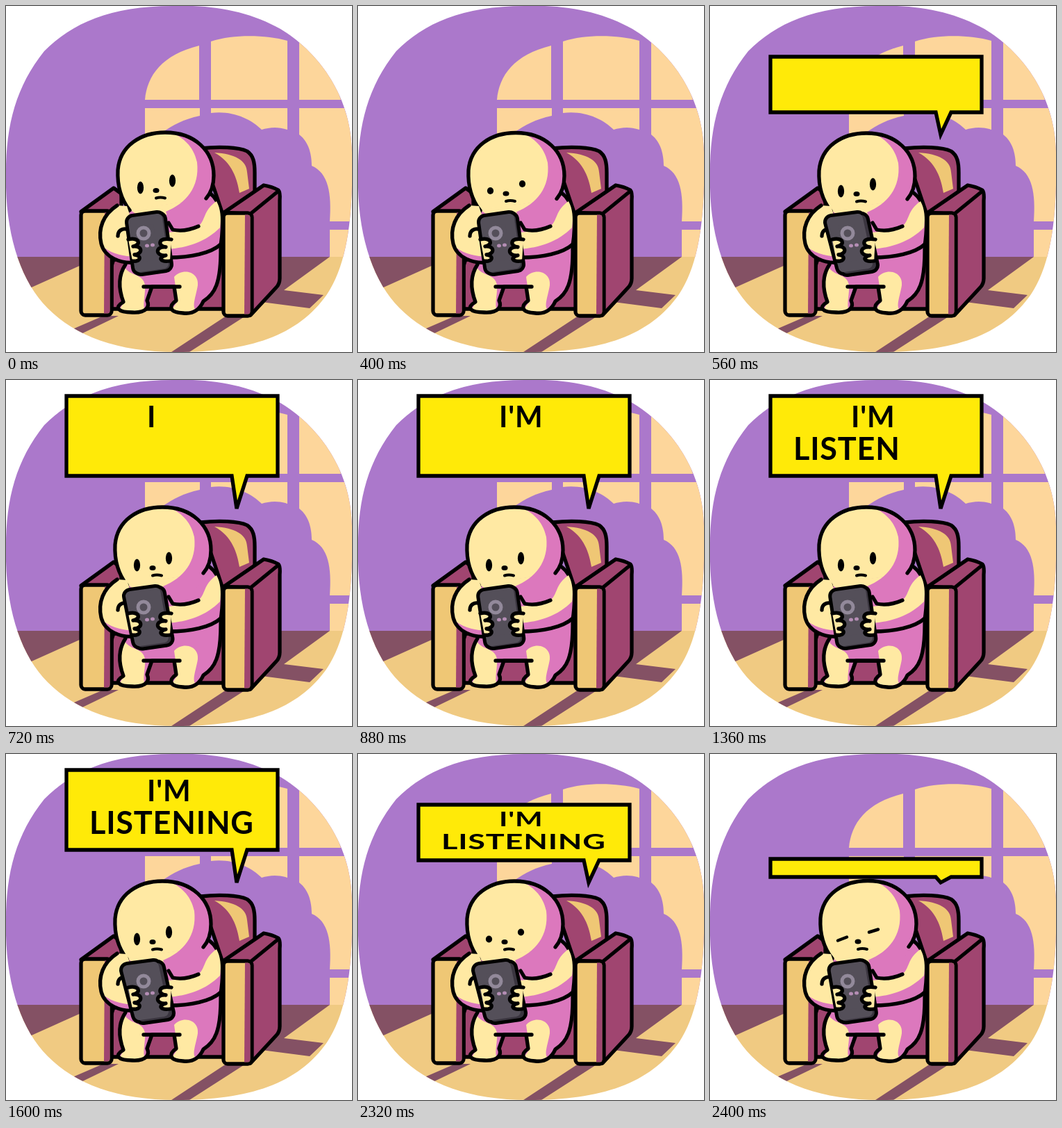
An HTML page that plays this animation: 498 by 498 pixels, repeating every 2.48 s.

```html
<!DOCTYPE html>
<html lang="en">
<head>
<meta charset="utf-8">
<title>I'm listening</title>
<style>
html, body { margin: 0; width: 100%; height: 100%; overflow: hidden; background: #fff; }
svg { display: block; width: 498px; height: 498px; }
.ink { fill: none; stroke: #000; stroke-width: 5.3; stroke-linecap: round; stroke-linejoin: round; }
.wall { fill: #ab78cb; }
.glass { fill: #fdd69b; }
.floor { fill: #845164; }
.sun { fill: #f0ca82; }
.chair { fill: #a04570; }
.cloth { fill: #efc775; }
.skin { fill: #ffe9a3; }
.pink { fill: #dc78bd; }
.yellow { fill: #ffea08; }
.lens { fill: none; stroke: #92899a; stroke-width: 5; }
.rim, .side, .front { stroke-linejoin: round; }
.rim { stroke: #000; stroke-width: 24; }
.side { fill: #3a353f; stroke: #3a353f; stroke-width: 14; }
.front { fill: #544f59; stroke: #544f59; stroke-width: 14; }
text { font: 700 45px Lato, "Open Sans", sans-serif; letter-spacing: 0.8px; }
</style>
</head>
<body>
<svg viewBox="0 0 498 498">
  <defs>
    <clipPath id="blob"><path d="M240 0C300-2 350 8 395 33C445 63 497 125 498 210C500 300 492 370 462 415C420 475 350 498 245 498C160 498 100 475 60 435C20 395-2 325 0 240C0 170 15 115 55 65C95 25 150 0 240 0Z"/></clipPath>
    <path id="torso" d="M172 372C160 390 163 410 169 426C155 434 161 441 182 441C203 442 207 432 203 424L210 404H242L245 424C235 431 233 441 255 442C272 444 280 434 284 425C300 415 310 400 309 345C314 312 313 284 292 268L175 290Z"/>
    <path id="leftArm" d="M160 287C140 300 132 320 137 342C142 362 165 371 186 369"/>
    <path id="skull" d="M174 295C160 277 156 257 157 237C160 202 190 183 225 183C268 183 295 210 295 245C295 260 291 270 284 278"/>
  </defs>

  <g clip-path="url(#blob)">
    <path class="wall" d="M0 0H498V362H0Z"/>
    <path class="glass" d="M200 135C203 100 225 70 278 57V135ZM295 135V51C330 40 375 42 405 50V135ZM422 135V51C452 70 472 100 482 135ZM200 147H279V158C255 163 240 172 226 181L200 200ZM295 147H405V178C390 173 378 175 368 178C352 162 325 150 295 154ZM422 147H487L498 180V310H466C469 270 464 240 440 230C440 205 431 192 422 185ZM466 322H498L490 361H466Z"/>
    <path class="sun" d="M0 361H498V498H0Z"/>
    <path class="floor" d="M0 361H108V373L30 408L0 422ZM140 446H162L106 473L96 465ZM238 498H264L345 446H317ZM390 361H466L400 409L457 416L437 435L360 425L390 395Z"/>
  </g>

  <g class="ink">
    <path class="chair" d="M280 205C305 202 335 203 347 209C356 215 358 225 358 240V275L312 300Z"/>
    <path class="cloth" stroke="none" d="M300 211C330 213 346 222 347 239L350 263L336 269C333 250 326 225 300 211Z"/>
    <path class="chair" d="M152 365H314V436H152Z"/>
    <path class="chair" d="M108 296L155 262L166 270V330L150 380V300Z"/>
    <path class="chair" d="M314 297L371 258Q383 260 392 265Q395 268 394 280V392Q394 400 389 405L352 445V300Z"/>
    <path d="M352 299L390 268"/>
    <rect class="cloth" x="108" y="295" width="44" height="150" rx="6"/>
    <path class="chair" stroke="none" d="M142 297.500H147Q149.500 298 149.500 302V438Q149.500 442 146 442.500H141Z"/>
    <rect class="cloth" x="313" y="298" width="41" height="148" rx="6"/>
    <path class="chair" stroke="none" d="M344 300.500H348Q351.500 301 351.500 305V439Q351.500 443 348 443.500H343Z"/>
  </g>

  <use href="#torso" class="pink"/>
  <path class="skin" d="M171 376C178 389 198 385 200 402C201 415 196 430 200 438C188 442 170 440 164 436L170 426C164 410 164 390 171 376ZM242 390C255 376 278 383 276 402C274 415 268 430 272 436C260 443 245 440 240 435L247 425Z"/>
  <use href="#torso" class="ink"/>
  <path class="ink" d="M198 404H250"/>

  <g id="head">
    <use href="#skull" class="skin"/>
    <path class="skin" d="M174 294L284 278L240 296L200 312Z"/>
    <path class="pink" d="M234 183C270 184 295 210 295 245C295 262 290 272 280 290L262 318L236 322L226 297C255 285 275 262 271 226C266 202 250 190 234 183Z"/>
    <use href="#skull" class="ink"/>
    <g id="face">
      <g id="eyes"><ellipse cx="188.500" cy="266.500" rx="4.600" ry="9"/><ellipse cx="234.500" cy="256.500" rx="4.600" ry="9"/></g>
      <path id="lids" class="ink" style="stroke-width:4.500" d="M182 269L195 264M227 257L240 253"/>
      <ellipse cx="211" cy="270.500" rx="4.500" ry="3.500"/>
      <path class="ink" style="stroke-width:4" d="M211 281.500Q217 279.500 224 281.500"/>
    </g>
  </g>

  <path class="skin" d="M174 288L160 287C140 300 132 320 137 342C142 362 165 371 186 369V325L178 300Z"/>
  <path class="pink" d="M140 347C155 358 170 360 186 361V369C165 371 148 364 140 347Z"/>
  <use href="#leftArm" class="ink"/>
  <path class="ink" d="M161 331C161 323 168 319 176 322"/>

  <path class="skin" d="M303 281C283 295 288 308 277 317C262 323 246 325 232 326V350C262 348 288 339 308 319C310 305 309 292 303 281Z"/>
  <path class="ink" d="M234 312L240 322C255 325 268 321 277 317M234 362C265 362 295 356 309 343"/>

  <g id="phone">
    <polygon class="rim"/><polygon class="rim"/>
    <polygon class="side"/><polygon class="front"/>
    <circle class="lens" cx="198" cy="327" r="8"/>
    <path fill="#b58eb5" d="M200 345a3 2.500 0 1 0 6 0a3 2.500 0 1 0-6 0M208 344a3 2.500 0 1 0 6 0a3 2.500 0 1 0-6 0"/>
  </g>

  <g class="ink" transform="translate(0 5)">
    <path class="skin" d="M176 331C192 327 195 339 183 341C197 340 197 352 185 353C196 354 194 364 182 362"/>
    <path class="skin" d="M238 331C218 327 218 341 230 342C214 341 215 355 230 354C218 357 222 364 236 362"/>
  </g>

  <g id="bubble">
    <path id="box" class="ink yellow" style="stroke-linejoin:miter"/>
    <g id="words">
      <text id="top" x="203" y="68" style="font-size:42px"></text>
      <text id="bottom" x="120" y="115"></text>
    </g>
  </g>
</svg>
<script>
const $ = id => document.getElementById(id);
const STEP = 80, LOOP = 2480;
const clamp = (v, lo, hi) => Math.max(lo, Math.min(hi, v));
const show = (el, on) => el.style.display = on ? "" : "none";
const polys = $("phone").querySelectorAll("polygon");

// tilt 0 is upright, 1 shows the phone's side
function drawPhone(tilt) {
  const front = [[183 - 8 * tilt, 311], [218 - 5 * tilt, 306], [227, 371], [192, 376]];
  const shift = 2 + 3 * tilt;
  const side = front.map(([x, y]) => [x + shift, y + 1 + tilt]);
  [side, front, side, front].forEach((p, i) => polys[i].setAttribute("points", p.join(" ")));
}

function drawBubble(n) {
  const open = n >= 6, strip = n === 6 || n === 30, mid = n === 7 || n === 29;
  const [y0, y1] = strip ? [151, 177] : mid ? [73, 153] : [23, 138];
  show($("bubble"), open);
  $("box").setAttribute("d", `M87 ${y0}H391V${y1}H347L332 185L325 ${y1}H87Z`);
  show($("words"), !strip);
  const k = (y1 - y0) / 115;
  $("words").setAttribute("transform", `translate(0 ${y0 - 23 * k}) scale(1 ${k})`);
  $("top").textContent = "I'M".slice(0, clamp(n - 8, 0, 3));
  $("bottom").textContent = "LISTENING".slice(0, clamp(n - 11, 0, 9));
}

function drawHead(n) {
  const shift = n < 5 ? 4 : n === 5 || n === 6 || n === 30 ? 2 : 0;
  const closed = n === 6 || n === 30, half = n === 5 || n === 29;
  $("head").setAttribute("transform", `translate(${shift} ${-shift / 4})`);
  $("face").setAttribute("transform", n < 5 ? "translate(1 -4)" : "");
  show($("eyes"), !closed);
  show($("lids"), closed);
  for (const eye of $("eyes").children) eye.setAttribute("ry", half ? 5 : 9);
}

function tiltAt(n) {
  if (n < 6) return 0;
  if (n === 6 || n === 30) return 0.3;
  if (n < 9 || n > 18) return 1;
  return n === 9 || n === 18 ? 0.5 : 0.1;
}

function frame() {
  const n = Math.floor(performance.now() % LOOP / STEP);
  drawHead(n);
  drawPhone(tiltAt(n));
  drawBubble(n);
  requestAnimationFrame(frame);
}
frame();
</script>
</body>
</html>
```
